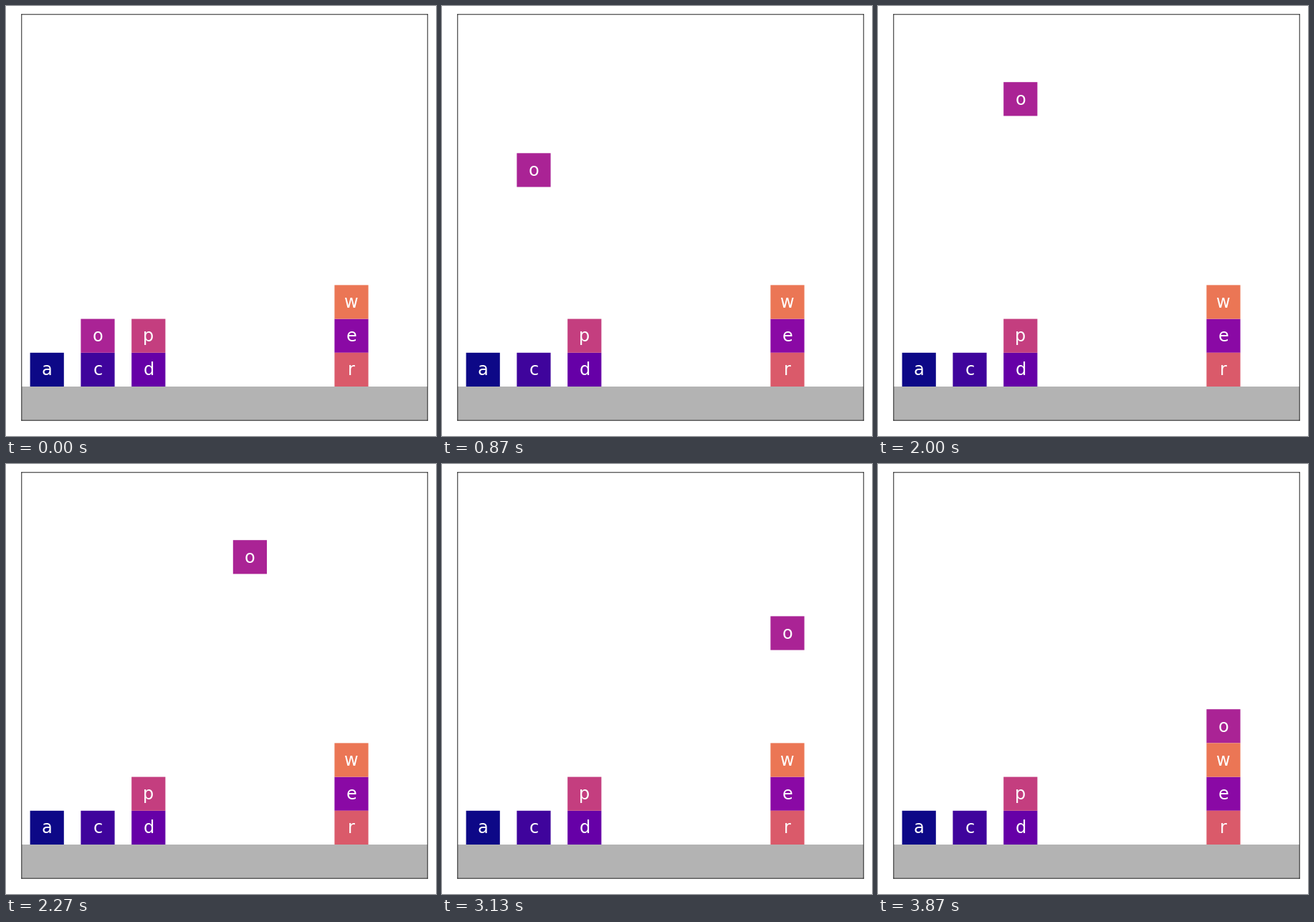
A matplotlib script that plays this animation: 600 px wide and 600 px high, repeating every 4870 ms.

```python
import matplotlib.pyplot as plt
from matplotlib.animation import FuncAnimation
from matplotlib.patches import Rectangle

TICK_MS, LOOP_MS = 10, 4870
COLUMNS = {"a": (0, 0), "c": (1, 0), "o": (1, 1), "d": (2, 0), "p": (2, 1),
           "r": (6, 0), "e": (6, 1), "w": (6, 2)}  # letter: (column, level)
LETTERS = sorted(COLUMNS)
LABEL_DX, LABEL_DY = 0.5, 0.48

fig = plt.figure(figsize=(6, 6), dpi=100, facecolor="white")
ax = fig.add_axes([21.8 / 600, 21.8 / 600, 566.4 / 600, 566.4 / 600])
ax.set(xlim=(0, 12), ylim=(0, 12), xticks=[], yticks=[])
for spine in ax.spines.values():
    spine.set(linewidth=0.63, snap=False)


def column_x(column):
    return 0.25 + 1.5 * column


def add_rect(x, y, width, color):
    return ax.add_patch(Rectangle((x, y), width, 1, facecolor=color,
                                  linewidth=0, snap=False))


def add_block(letter):
    column, level = COLUMNS[letter]
    x, y = column_x(column), 1 + level
    box = add_rect(x, y, 1, plt.cm.plasma(24 * LETTERS.index(letter)))
    label = ax.text(x + LABEL_DX, y + LABEL_DY, letter, color="white",
                    fontsize=17.28, family="DejaVu Sans",
                    ha="center", va="center")
    return box, label


def position(step):
    """Lift, pause, slide to the far stack, then lower."""
    x, y = column_x(1), 2
    if step >= 1:
        y += 0.35 * min(step + 1, 20)
    if step >= 30:
        x += 0.75 * min(step - 28, 10)
    if step > 38:
        y -= 0.25 * min(step - 38, 20)
    return x, y


add_rect(0, 0, 12, "0.7")
blocks = {letter: add_block(letter) for letter in LETTERS}
moving_box, moving_label = blocks["o"]


def update(tick):
    step = (6 * tick + 3) // 40  # 15 steps per second, rounded to the tick
    x, y = position(step)
    moving_box.set_xy((x, y))
    moving_label.set_position((x + LABEL_DX, y + LABEL_DY))
    return moving_box, moving_label


anim = FuncAnimation(fig, update, frames=LOOP_MS // TICK_MS, interval=TICK_MS,
                     repeat=True, repeat_delay=0)
plt.show()
```
